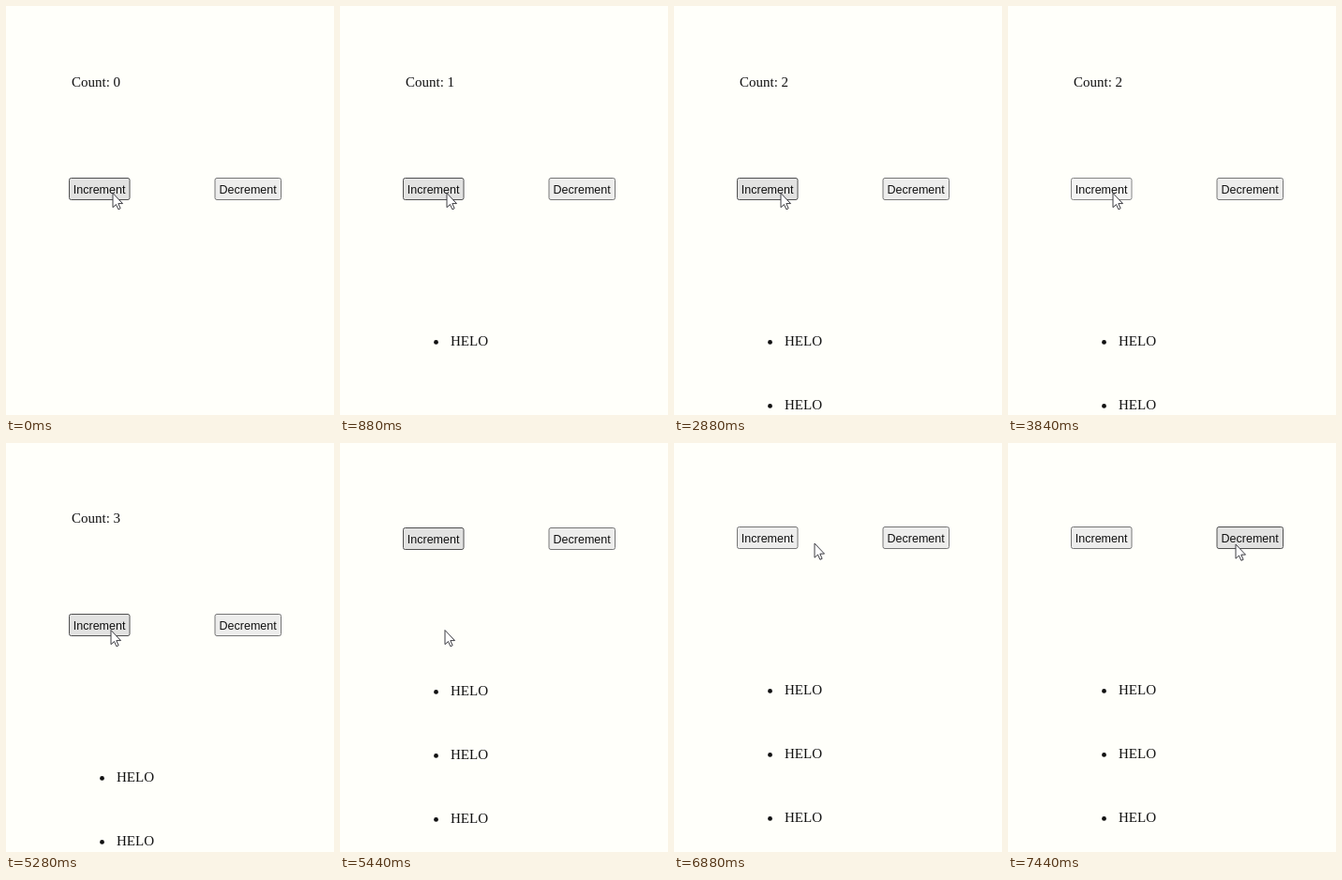
An HTML page for the animation above (7.52 s loop, 350x436 px).

```html
<!DOCTYPE html>
<html lang="en">
<head>
<meta charset="utf-8">
<title>Counter</title>
<style>
  html, body { margin: 0; height: 100%; overflow: hidden; background: #fffffa; }
  svg { display: block; width: 350px; height: 436px; }
  text { font: 15px "Liberation Serif", "Times New Roman", serif; fill: #111; }
  .button rect { fill: #ededec; stroke: #767676; }
  .button text { font: 12.5px "Liberation Sans", Arial, sans-serif; }
  .button.hover rect { fill: #e2e2e1; stroke: #505050; }
  .button.active rect { fill: #f4f4f3; stroke: #858585; }
</style>
</head>
<body>
<svg viewBox="0 0 350 436">
  <g id="page">
    <text id="count" x="70" y="86"></text>
    <g class="button" id="increment">
      <rect x="67.5" y="183.5" width="64.5" height="23" rx="2"/>
      <text x="71.8" y="199.6">Increment</text>
    </g>
    <g class="button" id="decrement">
      <rect x="223" y="183.5" width="70.5" height="23" rx="2"/>
      <text x="227.6" y="199.6">Decrement</text>
    </g>
    <g id="list"></g>
  </g>
  <path id="cursor" d="M0 0V15.2L3.5 12L5.9 17.3L8.1 16.3L5.8 11.1H10.5Z"
        fill="#fff" stroke="#3c3c42" stroke-linejoin="round"/>
</svg>
<script>
const LOOP = 7520, STEP = 80;
const $ = id => document.getElementById(id);

// Keys: [time, ...values]
const scrollKeys = [[5200, 0], [5280, 1], [5360, 64], [5440, 93], [5520, 94]];
const cursorKeys = [
  [3200, 114, 199.5], [3280, 112, 199.5], [5520, 112, 199.5], [6240, 122, 153],
  [6720, 126, 108], [6800, 128, 107], [6880, 150, 107], [7120, 243, 108]
];
const updates = [560, 2320, 4560];

function sample(keys, t) {
  const next = keys.findIndex(key => key[0] > t);
  if (next === 0) return keys[0].slice(1);
  if (next < 0) return keys[keys.length - 1].slice(1);
  const a = keys[next - 1], b = keys[next];
  const k = (t - a[0]) / (b[0] - a[0]);
  return a.slice(1).map((v, i) => v + (b[i + 1] - v) * k);
}

const within = (t, ...spans) => spans.some(([from, to]) => t >= from && t < to);

function setButton(id, hover, active) {
  $(id).classList.toggle('hover', hover);
  $(id).classList.toggle('active', active);
}

$('list').innerHTML = updates.map((_, i) =>
  `<g transform="translate(0 ${362 + 68 * i})">
    <circle cx="102.5" cy="-3.6" r="2.4" fill="#111"/><text x="118">HELO</text>
  </g>`).join('');

function draw(now) {
  const t = Math.floor(now % LOOP / STEP) * STEP;
  const count = updates.filter(time => t >= time).length;
  const [scroll] = sample(scrollKeys, t);
  const [x, y] = sample(cursorKeys, t);

  $('count').textContent = `Count: ${count}`;
  [...$('list').children].forEach((item, i) =>
    item.setAttribute('visibility', i < count ? 'visible' : 'hidden'));
  setButton('increment', within(t, [0, 5600], [6680, 6880]),
    within(t, [1760, 2000], [3840, 4000]));
  setButton('decrement', t >= 7040, within(t, [7280, 7440]));
  $('page').setAttribute('transform', `translate(0 ${-scroll})`);
  $('cursor').setAttribute('transform', `translate(${x} ${y})`);
}

const start = performance.now();
function tick() {
  draw(performance.now() - start);
  requestAnimationFrame(tick);
}
tick();
</script>
</body>
</html>
```
